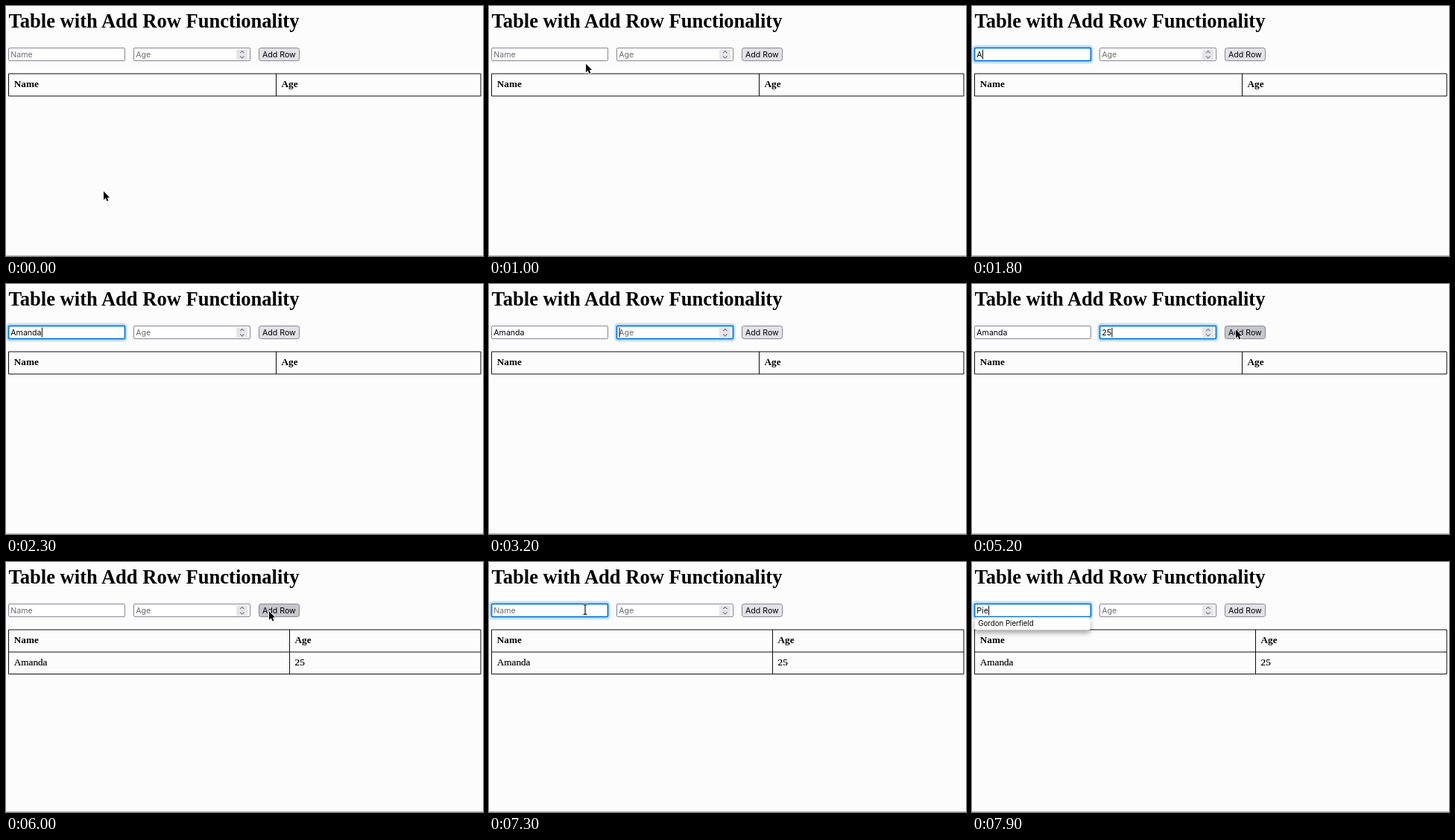
Recreate the animation shown at these times as an HTML page. Size 640 px wide and 336 px high, loop 8000 ms.

```html
<!DOCTYPE html>
<html lang="en">
<head>
<meta charset="utf-8">
<title>Table with Add Row Functionality</title>
<style>
  html, body { margin: 0; width: 100%; height: 100%; overflow: hidden; background: #fcfcfc; }
  svg { display: block; width: 100vw; height: 100vh; }
  text { white-space: pre; }
  .serif { font: 13.2px "Liberation Serif", "Times New Roman", serif; }
  .row { stroke: #000; stroke-width: .2; }
  .bold { font-weight: bold; }
  .title { font-size: 26.55px; }
  .sans { font: 10.6px Inter, "Liberation Sans", sans-serif; }
  .small { font-size: 9.7px; }
  .line { fill: none; stroke: #000; stroke-width: .95; }
  .chevron { fill: none; stroke: #77777d; stroke-width: 1.1; }
</style>
</head>
<body>
<svg viewBox="0 0 640 336">
  <defs>
    <filter id="shadow" x="-10%" y="-50%" width="120%" height="280%">
      <feDropShadow dx="0" dy="4" stdDeviation="3.2" flood-opacity=".34"/>
    </filter>
  </defs>
  <rect width="640" height="336" fill="#fcfcfc"/>
  <path d="M0 335.5H640" stroke="#b9b9b9"/>
  <text class="serif bold title" x="3.5" y="28.5">Table with Add Row Functionality</text>

  <g id="fields"></g>

  <g id="spinner">
    <rect x="309" y="58" width="15" height="14.5" rx="1.5" fill="#e6e6ea"/>
    <path class="chevron" d="M314 63.2L316.8 60.6L319.6 63.2M314 67.3L316.8 69.9L319.6 67.3"/>
  </g>

  <rect id="button" x="339.4" y="56.4" width="54.2" height="17.2" rx="3" stroke="#858591"/>
  <text class="sans" x="344" y="69">Add Row</text>

  <path id="grid" class="line"/>
  <text class="serif bold" x="10.8" y="109.2">Name</text>
  <text id="ageHead" class="serif bold" y="109.2">Age</text>
  <g id="row" class="serif row">
    <text x="10.8" y="139">Amanda</text>
    <text x="387.6" y="139">25</text>
  </g>

  <g id="menu">
    <rect id="menuBox" x="4" y="74.2" width="154.5" rx="2.5" fill="#fff" filter="url(#shadow)"/>
    <text id="item0" class="sans small" x="8.2" y="86.4"></text>
    <text id="item1" class="sans small" x="8.2" y="102.4"></text>
  </g>

  <path id="arrow" d="M0 0V11.6L2.7 9.1L4.5 13.2L6.4 12.4L4.6 8.4H8.1Z" fill="#000" stroke="#fff" stroke-width="1.6" paint-order="stroke"/>
  <g id="beam" fill="none">
    <path d="M-2.5 -6.5Q0 -6.5 0 -5V5Q0 6.5 -2.5 6.5M2.5 -6.5Q0 -6.5 0 -5M0 5Q0 6.5 2.5 6.5" stroke="#fff" stroke-width="2.4"/>
    <path d="M-2.5 -6.5Q0 -6.5 0 -5V5Q0 6.5 -2.5 6.5M2.5 -6.5Q0 -6.5 0 -5M0 5Q0 6.5 2.5 6.5" stroke="#000" stroke-width="1.1"/>
  </g>
</svg>
<script>
const LOOP = 8000, STEP = 100, BLINK = 500;
const NS = 'http://www.w3.org/2000/svg';
const $ = id => document.getElementById(id);
const show = (node, on) => node.setAttribute('visibility', on ? 'visible' : 'hidden');
const within = (t, a, b) => t >= a && t < b;

function add(parent, tag, attrs) {
  const node = document.createElementNS(NS, tag);
  for (const key in attrs) node.setAttribute(key, attrs[key]);
  return parent.appendChild(node);
}

function makeField(x, hint) {
  const g = $('fields');
  const halo = add(g, 'rect', { x: x - 2.8, y: 52.4, width: 162.4, height: 25.2, rx: 5, fill: '#c3e3fa' });
  const box = add(g, 'rect', { x: x + .5, y: 56.4, width: 156, height: 17.2, rx: 1.5, fill: '#fff' });
  const text = add(g, 'text', { class: 'sans', x: x + 3.3, y: 69 });
  const caret = add(g, 'rect', { y: 58.5, width: 1, height: 13, fill: '#000' });
  return (value, focused, caretOn) => {
    text.textContent = value;
    const end = x + 3.6 + (value ? text.getComputedTextLength() : 0);
    text.textContent = value || hint;
    text.setAttribute('fill', value ? '#000' : '#6c6c71');
    box.setAttribute('stroke', focused ? '#0676de' : '#858591');
    box.setAttribute('stroke-width', focused ? 1.8 : 1);
    caret.setAttribute('x', end);
    show(halo, focused);
    show(caret, focused && caretOn);
  };
}

const nameField = makeField(3, 'Name');
const ageField = makeField(171, 'Age');

// Each entry: start time, value
const nameKeys = [[0, ''], [1600, 'A'], [1900, 'Am'], [2000, 'Ama'], [2100, 'Aman'], [2200, 'Amand'],
  [2300, 'Amanda'], [5500, ''], [7600, 'P'], [7700, 'Pi'], [7900, 'Pie']];
const ageKeys = [[0, ''], [3600, '2'], [3900, '25'], [5500, '']];
const focusKeys = [[0, ''], [1300, 'name'], [2800, 'age'], [5400, ''], [6700, 'name']];
const menuKeys = [[0, []], [1900, ['Amanda', 'Amanda Colby']], [2200, []], [7700, ['Gordon Pierfield']]];
const tracks = [nameKeys, ageKeys, focusKeys];

const current = (keys, t) => keys.reduce((hit, key) => key[0] <= t ? key : hit);

// Each move: start, end, target x, target y
const moves = [[500, 1100, 130, 64], [1300, 1600, 140, 45], [4500, 5200, 354, 61.2],
  [5200, 5600, 353, 66.2], [6000, 6500, 129, 64]];

function pointerAt(t) {
  let x = 131, y = 249;
  for (const [a, b, tx, ty] of moves) {
    const k = Math.min(1, Math.max(0, (t - a) / (b - a)));
    const e = k * k * (3 - 2 * k);
    x += (tx - x) * e;
    y += (ty - y) * e;
  }
  return { x, y, shown: !within(t, 1600, 4500) && t < 7600 };
}

function drawPointer(p) {
  const inY = within(p.y, 56, 74);
  const overField = inY && (within(p.x, 3, 160) || within(p.x, 171, 308));
  for (const id of ['arrow', 'beam']) {
    $(id).setAttribute('transform', `translate(${p.x} ${p.y})`);
    show($(id), p.shown && overField === (id === 'beam'));
  }
  return p.shown && inY && within(p.x, 339, 394);
}

function draw(t) {
  const focus = current(focusKeys, t)[1];
  const lastInput = Math.max(...tracks.map(keys => current(keys, t)[0]));
  const caretOn = (t - lastInput) % (2 * BLINK) < BLINK;
  nameField(current(nameKeys, t)[1], focus === 'name', caretOn);
  ageField(current(ageKeys, t)[1], focus === 'age', caretOn);

  const added = t >= 5500;
  const split = added ? 380.5 : 362.5;
  const bottom = added ? 150.6 : 121;
  $('grid').setAttribute('d', `M3.5 91H637V${bottom}H3.5Z${added ? 'M3.5 121H637' : ''}M${split} 91V${bottom}`);
  $('ageHead').setAttribute('x', split + 7.1);
  show($('row'), added);

  const items = current(menuKeys, t)[1];
  $('menuBox').setAttribute('height', 1.4 + 16 * items.length);
  $('item0').textContent = items[0] || '';
  $('item1').textContent = items[1] || '';
  show($('menu'), items.length > 0);

  const hover = drawPointer(pointerAt(t));
  const pressed = hover && within(t, 5400, 5500);
  $('button').setAttribute('fill', pressed ? '#b1b1b9' : hover ? '#c6c6cd' : '#e2e2e7');
}

let start;
function tick(now) {
  start ??= now;
  const t = (now - start) % LOOP;
  draw(Math.floor(t / STEP) * STEP);
  requestAnimationFrame(tick);
}
draw(0);
requestAnimationFrame(tick);
</script>
</body>
</html>
```
